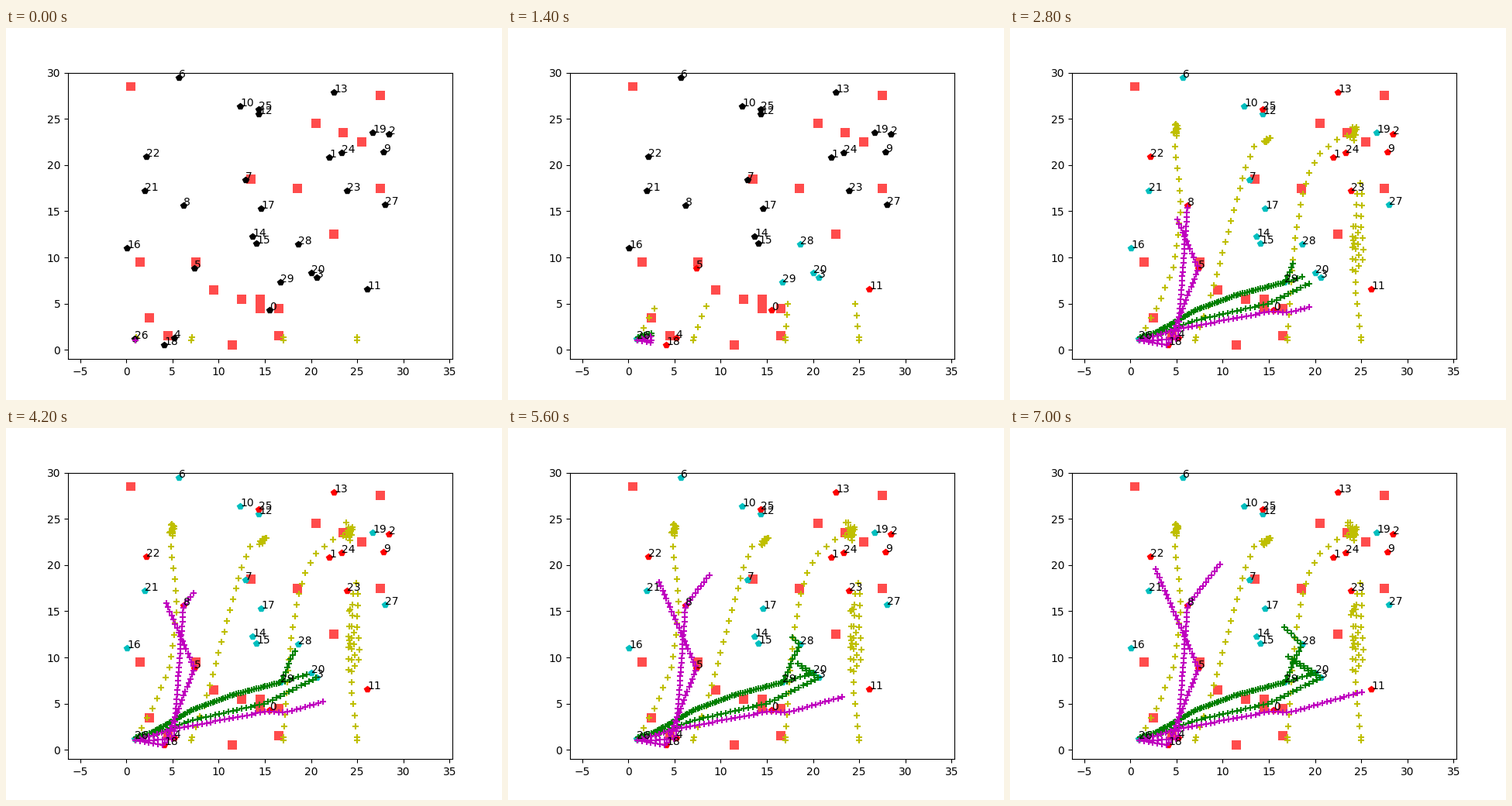
A matplotlib script for the animation above (8 s loop, 640 by 480 pixels).

```python
import numpy as np
import matplotlib.pyplot as plt
from matplotlib.animation import FuncAnimation
from matplotlib.patches import Rectangle

W, H, DPI = 640, 480, 100
SCALE = 369.6 / 31            # pixels per map unit
ORIGIN = np.array([80 + 6.3 * SCALE, 427.2 - SCALE])
FLIP = np.array([1, -1])
TICK, HOLD, FRAMES = 200, 7, 40
LAST = 5
BASE = (167, 403)

# Lower left corners of the blocked cells
CELLS = [(0, 28), (27, 27), (20, 24), (23, 23), (25, 22), (13, 18), (18, 17),
         (27, 17), (22, 12), (1, 9), (7, 9), (9, 6), (12, 5), (14, 5),
         (14, 4), (16, 4), (2, 3), (4, 1), (16, 1), (11, 0)]

# Goals in map units, numbered by position
GOALS = [(15.5, 4.3), (21.97, 20.8), (28.43, 23.3), (20.63, 7.8), (5.15, 1.25),
         (7.38, 8.8), (5.7, 29.45), (12.87, 18.38), (6.2, 15.6), (27.87, 21.4),
         (12.33, 26.35), (26.1, 6.55), (14.35, 25.5), (22.5, 27.85),
         (13.67, 12.25), (14.1, 11.5), (0.07, 11.0), (14.6, 15.27),
         (4.1, 0.5), (26.7, 23.5), (20.05, 8.3), (2.0, 17.2), (2.17, 20.9),
         (23.9, 17.2), (23.3, 21.3), (14.35, 26.0), (0.9, 1.23),
         (28.03, 15.7), (18.6, 11.4), (16.7, 7.3)]
RED_FIRST = {0, 4, 5, 11, 18}
CYAN_FIRST = {3, 20, 26, 28, 29}
RED_ALL = RED_FIRST | {1, 2, 8, 9, 13, 22, 23, 24, 25}


def to_map(pts):
    return (np.array(pts, float) - ORIGIN) * FLIP / SCALE


def along(route, dist):
    """Points at given distances along a polyline."""
    pts = np.array(route, float)
    steps = np.hypot(*np.diff(pts, axis=0).T)
    total = np.concatenate(([0], np.cumsum(steps)))
    dist = dist[dist <= total[-1]]
    return np.column_stack([np.interp(dist, total, c) for c in pts.T]), dist


def stop(i):
    """Stage position of a goal."""
    return tuple(ORIGIN + np.array(GOALS[i]) * FLIP * SCALE)


def search(route, reach, extra, phase=0):
    """Evenly spaced trail whose length grows with each stage."""
    reach = np.array(reach) + extra * (np.arange(LAST + 1) > 1)
    dist = np.append(0, np.arange(5.9 + phase, reach[-1] + 0.5, 5.9))
    pts, dist = along(route, dist)
    return to_map(pts), np.searchsorted(reach + 0.5, dist)


def blob(rng, a, b, width, count):
    """Jittered points around a short segment."""
    t = (np.arange(count) + rng.uniform(0, 1, count)) / count
    pts = np.outer(1 - t, a) + np.outer(t, b)
    return pts + rng.uniform(-width, width, (count, 2))


def scout(route, first, later, seed):
    """Long strides to a place, then small moves around it."""
    rng = np.random.default_rng(seed)
    pts, dist = along(route, np.append(0, np.arange(4, 500, 14.3)))
    parts = [pts, blob(rng, *first)]
    when = [np.searchsorted([5, 48], dist), np.full(first[-1], 2)]
    for stage in range(3, LAST + 1):
        parts.append(blob(rng, *later))
        when.append(np.full(later[-1], stage))
    return to_map(np.vstack(parts)), np.concatenate(when)


scouts = [
    scout([BASE, (168, 399), (190, 360), (212, 307), (220, 237), (219, 208),
           (211, 139)],
          ((215, 124), (214, 137), 3, 14), ((215, 124), (214, 134), 3, 2), 1),
    scout([(239, 403), (240, 399), (256, 358), (304, 180), (315, 153),
           (325, 151)],
          ((328, 147), (335, 142), 2, 9), ((327, 150), (334, 141), 3, 3), 2),
    scout([(358, 403), (358, 399), (363, 327), (368, 270), (378, 213),
           (386, 188), (400, 161), (422, 144), (440, 137)],
          ((444, 128), (442, 144), 4, 13), ((437, 121), (443, 139), 3, 4), 3),
    scout([(453, 403), (453, 399), (446, 341), (446, 270), (448, 213),
           (452, 200), (454, 213), (453, 257), (457, 294), (450, 310),
           (449, 256), (442, 256), (442, 313)],
          ((443, 285), (443, 271), 1, 2), ((438, 239), (444, 230), 3, 2), 4),
]

CLIMB = [BASE, (166, 399), (186, 394), (240, 364), (290, 345), stop(29)]
GREEN_REACH = [0, 25, 234, 250, 274, 295]
greens = [
    search(CLIMB + [stop(20), stop(14)], GREEN_REACH, -3),
    search(CLIMB + [(361, 314), (366, 301), stop(28), stop(17)],
           GREEN_REACH, 1, 3),
    search([BASE, (166, 399), (186, 397), (245, 376), (335, 355), stop(3),
            stop(15)], GREEN_REACH, 4),
]

MAGENTA_REACH = [0, 21, 221, 243, 271, 292]
magentas = [
    search([BASE, stop(18), stop(5), stop(22)], MAGENTA_REACH, -4),
    search([BASE, (189, 403), stop(4), stop(8), stop(25)], MAGENTA_REACH, 0),
    search([BASE, (186, 398), (210, 390), (335, 366), (361, 367), stop(11)],
           MAGENTA_REACH, 5),
]


def goal_color(i, stage):
    if stage == 0:
        return "k"
    if stage == 1:
        return "r" if i in RED_FIRST else "c" if i in CYAN_FIRST else "k"
    return "r" if i in RED_ALL else "c"


plt.rcParams["font.family"] = "DejaVu Sans"
fig, ax = plt.subplots(figsize=(W / DPI, H / DPI), dpi=DPI)
ax.set_xlim(-6.3, 35.3)
ax.set_ylim(-1, 30)

for cell in CELLS:
    ax.add_patch(Rectangle(cell, 1, 1, fc="r", ec="none", alpha=0.7))


def team(trails, color, zorder):
    line, = ax.plot([], [], "+", color=color, mew=1.5, zorder=zorder)
    pts, when = zip(*trails)
    return line, np.vstack(pts), np.concatenate(when)


teams = [team(scouts, "y", 2), team(greens, "g", 2.6),
         team(magentas, "m", 2.7)]
goals = []
for i, (x, y) in enumerate(GOALS):
    goals += ax.plot(x, y, "p", color="k", zorder=2.5)
    ax.text(x, y, str(i), zorder=3)


def update(frame):
    stage = min(frame // HOLD, LAST)
    for line, pts, when in teams:
        line.set_data(*pts[when <= stage].T)
    for i, goal in enumerate(goals):
        goal.set_color(goal_color(i, stage))
    return [line for line, *_ in teams] + goals


anim = FuncAnimation(fig, update, frames=FRAMES, interval=TICK,
                     repeat=True, repeat_delay=0, blit=False)
plt.show()
```
